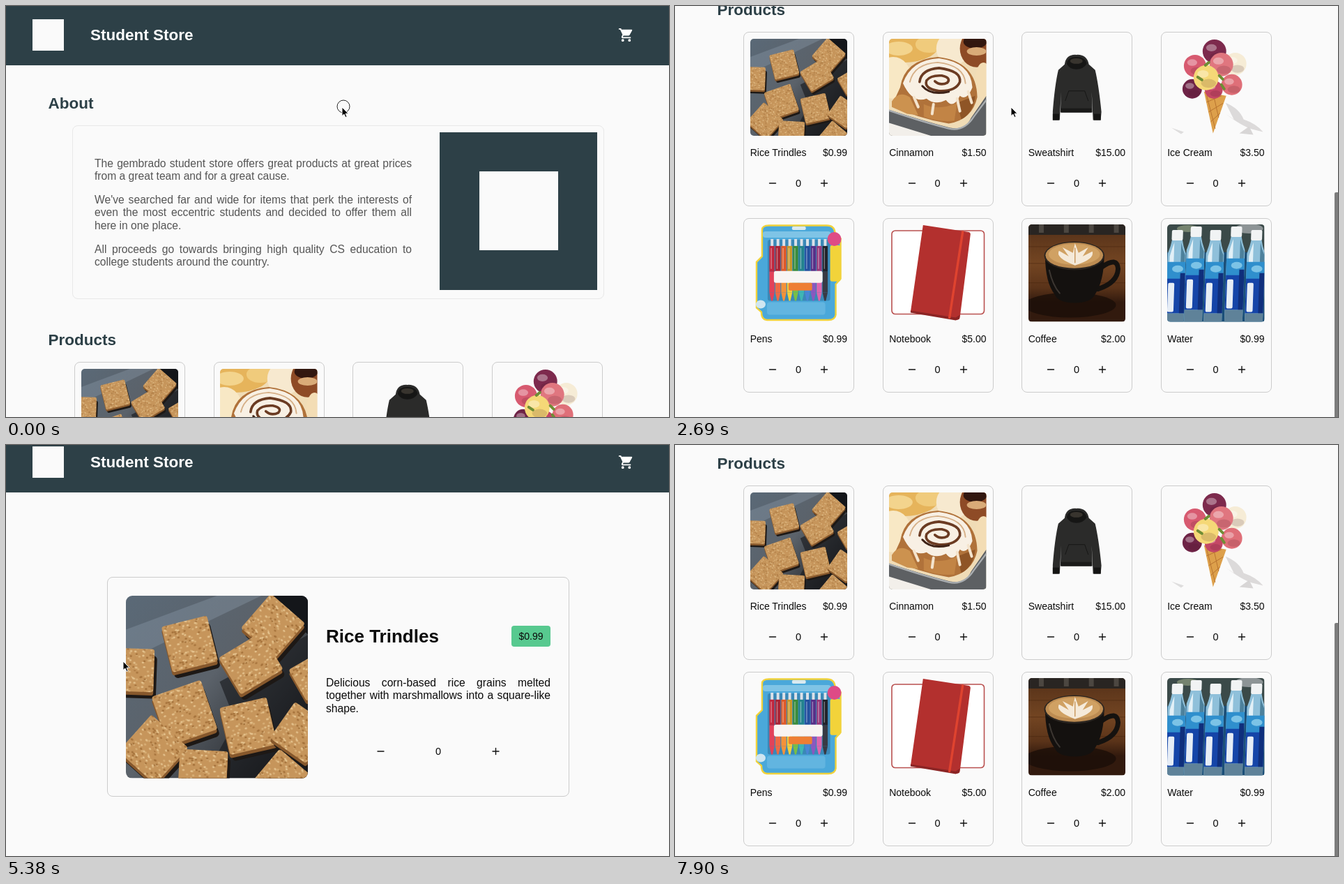
An HTML page that plays this animation: 951x589 px, repeating every 8 s.

```html
<!DOCTYPE html>
<html lang="en">
<head>
<meta charset="utf-8">
<title>Student Store</title>
<style>
  html, body { margin: 0; width: 100%; height: 100%; overflow: hidden; background: #fafafa; }
  #stage { position: relative; width: 951px; height: 589px; overflow: hidden; background: #fafafa;
    font: 14px "Liberation Sans", Arial, sans-serif; color: #0b0b0b; }
  .page { position: absolute; left: 0; top: 0; width: 951px; height: 1080px; }
  .page > *, #bar, #cursor { position: absolute; box-sizing: border-box; }
  .text { line-height: 0; white-space: nowrap; }
  .box { border: 1px solid #ccc; border-radius: 8px; }
  .box.hover { border-color: #57c98f; }
  .art { overflow: hidden; }
  #bar { right: 0; width: 5px; background: rgba(0, 0, 0, .5); border-radius: 2px 0 0 2px; }
  #cursor { left: 0; top: 0; overflow: visible; }
</style>
</head>
<body>
<div id="stage">
  <div class="page" id="store"></div>
  <div class="page" id="detail"></div>
  <div id="bar"></div>
  <svg id="cursor" width="1" height="1">
    <g id="ring" fill="none">
      <circle cx="2" cy="-1" r="8.7" stroke="#fff" stroke-width="2.6"/>
      <circle cx="2" cy="-1" r="9" stroke="#222"/>
    </g>
    <path d="M0 0V12.6L2.9 10L5 14.6L7 13.7L5.1 9.2H9Z" fill="#000" stroke="#fff"/>
  </svg>
</div>
<script>
const $ = id => document.getElementById(id);
const LOOP = 8000, DARK = '#2d4047', GREEN = '#57c98f';

// ---- illustrations, each on a 140 x 140 field ----
const rect = (x, y, w, h, fill, more = '') =>
  `<rect x="${x}" y="${y}" width="${w}" height="${h}" fill="${fill}" ${more}/>`;
const oval = (x, y, rx, ry, fill, more = '') =>
  `<ellipse cx="${x}" cy="${y}" rx="${rx}" ry="${ry}" fill="${fill}" ${more}/>`;
const path = (d, fill, more = '') => `<path d="${d}" fill="${fill}" ${more}/>`;
const line = (d, stroke, width, more = '') =>
  path(d, 'none', `stroke="${stroke}" stroke-width="${width}" stroke-linecap="round" ${more}`);

let seed = 7;
const random = () => (seed = seed * 16807 % 2147483647) / 2147483647;
const crumbs = Array.from({ length: 70 }, (_, i) =>
  oval(random() * 24, random() * 24, .9, .7, ['#e6c48f', '#a4713a', '#d9b077'][i % 3])).join('');

const bar = ([x, y, size, turn, h = size]) => `<g transform="translate(${x} ${y})">
  <g transform="translate(2 5) rotate(${turn})">${rect(-size / 2, -h / 2, size, h, '#1d1815', 'rx="3"')}</g>
  <g transform="translate(0 2.6) rotate(${turn})">${rect(-size / 2, -h / 2, size, h, '#87582c', 'rx="2"')}</g>
  <g transform="rotate(${turn})">${rect(-size / 2, -h / 2, size, h, 'url(#crumb)', 'rx="2"')}</g></g>`;

const squares = () => rect(0, 0, 140, 140, 'url(#slate)')
  + path('M0 26L70 0H104L0 50Z', '#8796a5', 'opacity=".4"')
  + path('M84 96L72 66L140 30V140H60Z', '#16181b', 'opacity=".6"')
  + path('M110 0H140V30Z', '#14161a')
  + [[49, 37, 36, -14], [113, 23, 35, 41], [96, 52, 38, -31, 33], [5, 57, 33, 2], [45, 90, 40, -19],
     [94, 100, 37, -13], [21, 118, 38, 42], [59, 137, 37, 3], [134, 105, 34, 35], [120, 140, 32, 40],
     [144, 62, 28, -30]].map(bar).join('');

const roll = () => rect(0, 0, 140, 140, '#f0dcb6')
  + oval(22, 8, 50, 26, '#e6b45b') + oval(14, 14, 20, 10, '#f3d48d') + oval(58, 8, 20, 12, '#f0cb7c')
  + oval(92, 14, 24, 24, '#f7e9cf') + oval(126, 14, 24, 27, '#8e4b26') + oval(124, 4, 17, 10, '#32170f')
  + oval(126, 18, 14, 6, '#d9ab78') + oval(6, 56, 26, 30, '#f8e8c5') + oval(136, 60, 12, 26, '#f3ddb5')
  + path('M0 102Q50 118 88 128Q110 132 118 114L140 82V140H0Z', '#5d6063')
  + line('M0 103Q50 120 86 129Q108 134 122 112L140 88', '#a9adb0', 2.4)
  + path('M0 121L62 140H0Z', '#f2efea')
  + path('M16 70Q22 30 70 26Q126 32 127 84Q120 116 86 122Q40 114 4 96Z', '#b0723a')
  + path('M4 90Q14 74 30 84L42 110L26 108L4 98Z', '#cc924f')
  + path('M50 94Q72 104 98 92L94 118Q70 120 50 112Z', '#c28445')
  + path('M98 92L124 82Q122 106 104 116Z', '#8f5526')
  + path('M20 64Q32 30 72 28Q118 34 120 70Q112 90 102 82Q92 102 82 88Q66 96 54 86Q34 94 20 64Z', '#f8f0e4')
  + line('M30 62Q36 36 70 34Q108 38 110 64', '#d6b088', 2)
  + line('M44 62Q46 44 72 42Q104 46 102 62Q96 76 72 75Q50 72 54 60Q60 52 76 53Q90 56 84 63Q74 68 66 61', '#6b3b22', 3.6)
  + line('M48 68Q60 82 86 76', '#3f2317', 3)
  + line('M98 86L102 104M64 94L62 108M114 76L119 92M36 84L42 98', '#f4e4cd', 4);

const hoodie = () => path('M52 37Q54 22 69 23Q84 22 87 37L96 45Q101 66 105 105L104 117H93L91 76L92 106H46L47 76L45 117H35V104Q38 66 43 45Z', '#2b2b2a')
  + path('M55 36Q56 26 69 26Q82 26 84 36Q79 44 69 44Q59 44 55 36Z', '#161615')
  + oval(69, 32, 9, 4, '#38342e')
  + line('M53 89L58 75H81L86 89', '#171716', 1)
  + rect(35, 108, 9, 9, '#141413') + rect(94, 108, 10, 9, '#141413') + rect(47, 100, 44, 6, '#1a1a19');

const scoops = [[98, 36, 16, '#f6ecd6'], [68, 18, 17, '#7d2a4d'], [40, 39, 16, '#d75a70'], [78, 37, 17, '#e0767f'],
  [36, 72, 14, '#6e2346'], [93, 66, 15, '#df6f78'], [67, 73, 13, '#c44765'], [56, 56, 18, '#f5d877']];
const scoop = ([x, y, r, c]) => oval(x, y, r, r, c) + oval(x + r * .2, y + r * .45, r * .6, r * .35, '#401020', 'opacity=".15"')
  + oval(x - r * .25, y - r * .3, r * .45, r * .3, '#fff', 'opacity=".35"');
const cone = () => path('M84 92Q104 100 110 116Q128 122 138 134L122 130Q108 126 84 108L96 116Z', '#dcdada')
  + path('M104 136L118 126L124 138Z', '#d8d6d6') + path('M6 128L24 134L20 137Z', '#dedddd')
  + path('M53 76L85 82L66 136Z', '#dda04b')
  + line('M57 91L78 82M60 105L80 93M63 119L76 107M66 78L74 113M57 82L69 129', '#b87430', 1)
  + scoops.map(scoop).join('')
  + line('M44 55L50 59M75 53L80 58M60 34L55 38M78 66L82 72', '#6f8d34', 4);

const inks = ['#c02840', '#a82436', '#df5a2a', '#c9982a', '#3a8c3c', '#24838e', '#24509e', '#583088', '#98387a', '#22232b'];
const grips = ['#e2425a', '#ee6a44', '#f4923a', '#f3cf3c', '#78c045', '#3fb6b4', '#4a86d6', '#8a58c0', '#dc66ae', '#383a44'];
const pen = (ink, i) => { const x = 27.5 + i * 8.5;
  return rect(x + 1.8, 21, 4, 12, '#dce1e8') + rect(x, 31, 7.4, 37, ink) + rect(x + 2, 34, 1.4, 30, '#fff', 'opacity=".4"')
    + rect(x, 68, 7.4, 30, grips[i]) + path(`M${x} 98H${x + 7.4}L${x + 4.7} 110H${x + 2.7}Z`, grips[i]); };
const pens = () => path('M17 8Q17 1.5 27 1.5H110Q121 1.5 122 12L130 20V78L123 86V130Q122 137.5 112 137.5H24Q16 137 16 126L9 120V54L17 46Z', '#4aa8da', 'stroke="#f1d23a" stroke-width="2.4"')
  + rect(18, 10, 98, 9, '#7fc4e6', 'rx="4"') + rect(60, 3, 20, 5, '#d9eaf0', 'rx="2"')
  + rect(25, 22, 90, 88, '#2f6f9c', 'rx="3" opacity=".55"') + rect(24, 112, 84, 18, '#74bfe4', 'rx="4" opacity=".6"')
  + inks.map(pen).join('')
  + rect(34, 67, 70, 17, '#f8f4f2', 'rx="3"') + rect(55, 84, 34, 11, '#ee7e34', 'rx="2"')
  + rect(115, 30, 15, 52, '#f2d33a', 'rx="3"') + oval(121, 21, 10, 10, '#de4b86') + oval(15, 115, 7, 6, '#cfe6f1');

const notebook = () => rect(4, 9, 133, 120, '#fff', 'rx="5" stroke="#b9504f" stroke-width="1.6"')
  + path('M49 1L115 11Q118 12 117 16L102 134Q101 138 96 137L31 126Z', '#b3302e')
  + path('M31 124L96 134L102 130L101 136L96 138L31 127Z', '#8b2424') + line('M106 11L87 134', '#df432f', 3.4);

const coffee = () => rect(0, 0, 140, 140, 'url(#wood)') + rect(0, 0, 140, 15, '#292522')
  + [0, 1, 2, 3].map(i => rect(15 + i * 36, 0, 7, 12, '#4c4741')).join('')
  + line('M0 32H140M0 56H140M0 84H140', '#49260f', 1.2, 'opacity=".5"')
  + oval(60, 116, 66, 18, '#1b0e08', 'opacity=".8"')
  + line('M106 61Q128 46 129 64Q128 84 100 93', '#15120f', 7)
  + path('M24 44Q24 84 38 101Q42 112 66 113Q90 112 95 102Q109 82 109 44Z', '#14110f')
  + oval(66, 45, 43.5, 20.5, '#2b2520') + oval(66, 44.5, 41.5, 18.5, '#bd8c52') + oval(66, 43, 37, 15, '#d0a163')
  + path('M67 59Q38 48 44 38L58 46L49 33L64 41L67 27L72 41L86 33L78 46L92 39Q96 50 67 59Z', '#f5ead9')
  + line('M67 34V55', '#c6955a', 1.4) + line('M30 66Q35 88 45 99', '#3c3631', 2);

const bottle = (x, i) => { const y = i % 2 ? 3 : 8;
  return `<g transform="translate(${x} ${y}) skewX(-2)">`
    + path('M-7 12H7Q9 24 13 34V140H-13V34Q-9 24 -7 12Z', '#8fc0da') + rect(-8, 0, 16, 15, '#f1f3f4', 'rx="2"')
    + path('M-10 38Q-7 26 -4 18V52H-10Z', '#e2f0f7') + path('M6 18Q8 28 12 36V50H6Z', '#4d819c')
    + rect(-13, 46, 26, 26, '#2f8fcd') + oval(2, 56, 8, 5, '#7cc3e6')
    + rect(-13, 70, 26, 50, '#1545a8') + rect(6, 62, 7, 58, '#0f2f7c')
    + rect(-11, 76, 9, 42, '#e6edf6', 'rx="2"') + rect(-13, 120, 26, 20, '#5f8299') + '</g>'; };
const water = () => rect(0, 0, 140, 140, '#3b4a49') + rect(0, 40, 140, 100, '#1b4f78')
  + oval(30, 6, 16, 5, '#75836f') + oval(118, 6, 20, 7, '#8d9496')
  + [15, 42, 70, 100, 129].map(bottle).join('');

const arts = { squares, roll, hoodie, cone, pens, notebook, coffee, water };
const defs = `<defs>
  <linearGradient id="slate" x2="1" y2=".8"><stop stop-color="#5a6977"/><stop offset=".5" stop-color="#5b626a"/><stop offset="1" stop-color="#1c1d20"/></linearGradient>
  <linearGradient id="wood" x2="0" y2="1"><stop stop-color="#543018"/><stop offset=".4" stop-color="#734522"/><stop offset=".65" stop-color="#5a3319"/><stop offset=".8" stop-color="#321a0e"/></linearGradient>
  <pattern id="crumb" width="24" height="24" patternUnits="userSpaceOnUse">${rect(0, 0, 24, 24, '#c6955b')}${crumbs}</pattern>
  ${Object.entries(arts).map(([id, draw]) => `<symbol id="${id}" viewBox="0 0 140 140">${draw()}</symbol>`).join('')}</defs>`;
$('stage').insertAdjacentHTML('afterbegin', `<svg width="0" height="0" style="position:absolute">${defs}</svg>`);

// ---- page parts, all in page coordinates; text y is the middle of its line ----
const block = (x, y, w, h, css = '', cls = '') =>
  `<div class="${cls}" style="left:${x}px;top:${y}px;width:${w}px;height:${h}px;${css}"></div>`;
const text = (x, y, str, css = '') => `<div class="text" style="left:${x}px;top:${y}px;${css}">${str}</div>`;
const textEnd = (x, y, str) => `<div class="text" style="right:${951 - x}px;top:${y}px">${str}</div>`;
const textMid = (x, y, str, css = '') => text(x - 50, y, str, 'width:100px;text-align:center;' + css);
const heading = (x, y, str, color = DARK, size = 22.5) => text(x, y, str, `font-weight:bold;font-size:${size}px;color:${color}`);
const art = (id, x, y, size, radius) =>
  `<svg class="art" width="${size}" height="${size}" style="left:${x}px;top:${y}px;border-radius:${radius}px"><use href="#${id}"/></svg>`;
const para = (x, y, w, lines, color) => lines.map((str, i) => text(x, y + i * 18.3, str,
  `width:${w}px;font-size:15.64px;color:${color};white-space:normal;text-align-last:${i < lines.length - 1 ? 'justify' : 'left'}`)).join('');
const quantity = (x, y, gap) => textMid(x, y, '0', 'font-size:14.5px')
  + `<svg width="200" height="12" style="left:${x - 100}px;top:${Math.round(y) - 6}px">`
  + line(`M${95.5 - gap} 6h9M${95.5 + gap} 6h9m-4.5 -4.5v9`, '#111', 1.4) + '</svg>';

const CART = 'M7 18a2 2 0 1 0 0 4a2 2 0 0 0 0-4zM1 2v2h2l3.6 7.59-1.35 2.45C4.52 15.37 5.48 17 7 17h12v-2H7.42a.25.25 0 0 1-.22-.37l.9-1.63h7.45c.75 0 1.41-.41 1.75-1.03l3.58-6.49A1 1 0 0 0 20 4H5.21l-.94-2zM17 18a2 2 0 1 0 0 4a2 2 0 0 0 0-4z';
const header = block(0, 0, 951, 85, `background:${DARK}`) + block(38, 19, 45, 45, 'background:#fafafa')
  + heading(121, 42, 'Student Store', '#fff')
  + `<svg width="23" height="23" viewBox="0 0 24 24" style="left:878px;top:30px">${path(CART, '#fff')}</svg>`;

const goods = [['squares', 'Rice Trindles', '$0.99'], ['roll', 'Cinnamon', '$1.50'], ['hoodie', 'Sweatshirt', '$15.00'],
  ['cone', 'Ice Cream', '$3.50'], ['pens', 'Pens', '$0.99'], ['notebook', 'Notebook', '$5.00'],
  ['coffee', 'Coffee', '$2.00'], ['water', 'Water', '$0.99']];
const spots = goods.map((_, i) => [98 + i % 4 * 199.5, 510 + (i >> 2) * 266.7]);
const card = ([id, name, price], i) => { const [x, y] = spots[i];
  return block(x, y, 159, 250, '', 'box card') + art(id, x + 9.7, y + 9.7, 139.5, 5)
    + text(x + 9.7, y + 173, name) + textEnd(x + 149, y + 173, price) + quantity(x + 79, y + 217, 37); };

$('store').innerHTML = header + heading(60.5, 140, 'About') + block(95, 171, 763, 249, 'border-color:#e8e8e8', 'box')
  + para(127, 226, 455, ['The gembrado student store offers great products at great prices', 'from a great team and for a great cause.'], '#555')
  + para(127, 278, 455, ["We've searched far and wide for items that perk the interests of",
    'even the most eccentric students and decided to offer them all', 'here in one place.'], '#555')
  + para(127, 349, 455, ['All proceeds go towards bringing high quality CS education to', 'college students around the country.'], '#555')
  + block(622, 180.5, 226, 226, `background:${DARK}`) + block(679, 237, 113, 113, 'background:#fafafa')
  + heading(60.5, 479, 'Products') + goods.map(card).join('');

$('detail').innerHTML = header + block(145, 206, 663, 315, '', 'box') + art('squares', 171.5, 233, 261.5, 9)
  + heading(459, 291, 'Rice Trindles', '#0b0b0b', 26)
  + block(725, 276, 56, 30, `background:${GREEN};border-radius:4px`) + textMid(753, 291, '$0.99')
  + para(459, 358, 322, ['Delicious corn-based rice grains melted', 'together with marshmallows into a square-like', 'shape.'], '#0b0b0b')
  + quantity(620, 456, 82.5);

// ---- time steps: [ms, value...] ----
const scrolls = [[0, 0], [1650, 8], [1800, 92], [1950, 228], [2090, 356], [2240, 420], [2390, 450], [2540, 466], [2690, 473],
  [2990, 461], [3130, 452], [4630, 17], [5830, 13], [5970, 10], [6420, 9], [6570, 0], [7900, 452]];
const barFade = [[0, 0], [1800, 1], [3730, .6], [3880, .3], [4030, 0], [6420, 1], [6860, .7], [7010, .4], [7150, .15], [7300, 0], [7900, 1]];
const pointer = [[0, 482, 145], [3730, 405, 165], [3880, 250, 172], [4030, 92, 168], [4180, 135, 156],
  [5230, 148, 215], [5380, 168, 310], [5530, 177, 365], [6860, 140, 270], [7010, 75, 130], [7150, 20, 30], [7300, -40, -40]];
const clicks = [[0, 1], [150, 0], [4480, 1], [4630, 0]];
const at = (steps, t) => steps.findLast(step => step[0] <= t).slice(1);

const cards = [...document.querySelectorAll('.card')];
const start = performance.now();
function render() {
  const t = Math.max(0, performance.now() - start) % LOOP;
  const [scroll] = at(scrolls, t), [fade] = at(barFade, t), [x, y] = at(pointer, t), [click] = at(clicks, t);
  const onDetail = t >= 4630 && t < 7900;
  $('store').style.display = onDetail ? 'none' : '';
  $('detail').style.display = onDetail ? '' : 'none';
  $(onDetail ? 'detail' : 'store').style.transform = `translateY(${-scroll}px)`;
  cards.forEach((el, i) => {
    const dx = x - spots[i][0], dy = y + scroll - spots[i][1];
    el.classList.toggle('hover', dx > 0 && dx < 159 && dy > 0 && dy < 250);
  });
  $('bar').style.cssText = `opacity:${fade};top:${onDetail ? scroll + 1 : scroll * .565}px;height:${onDetail ? 590 : 345}px`;
  $('cursor').style.transform = `translate(${x}px,${y}px)`;
  $('ring').style.display = click ? '' : 'none';
  requestAnimationFrame(render);
}
render();
</script>
</body>
</html>
```
